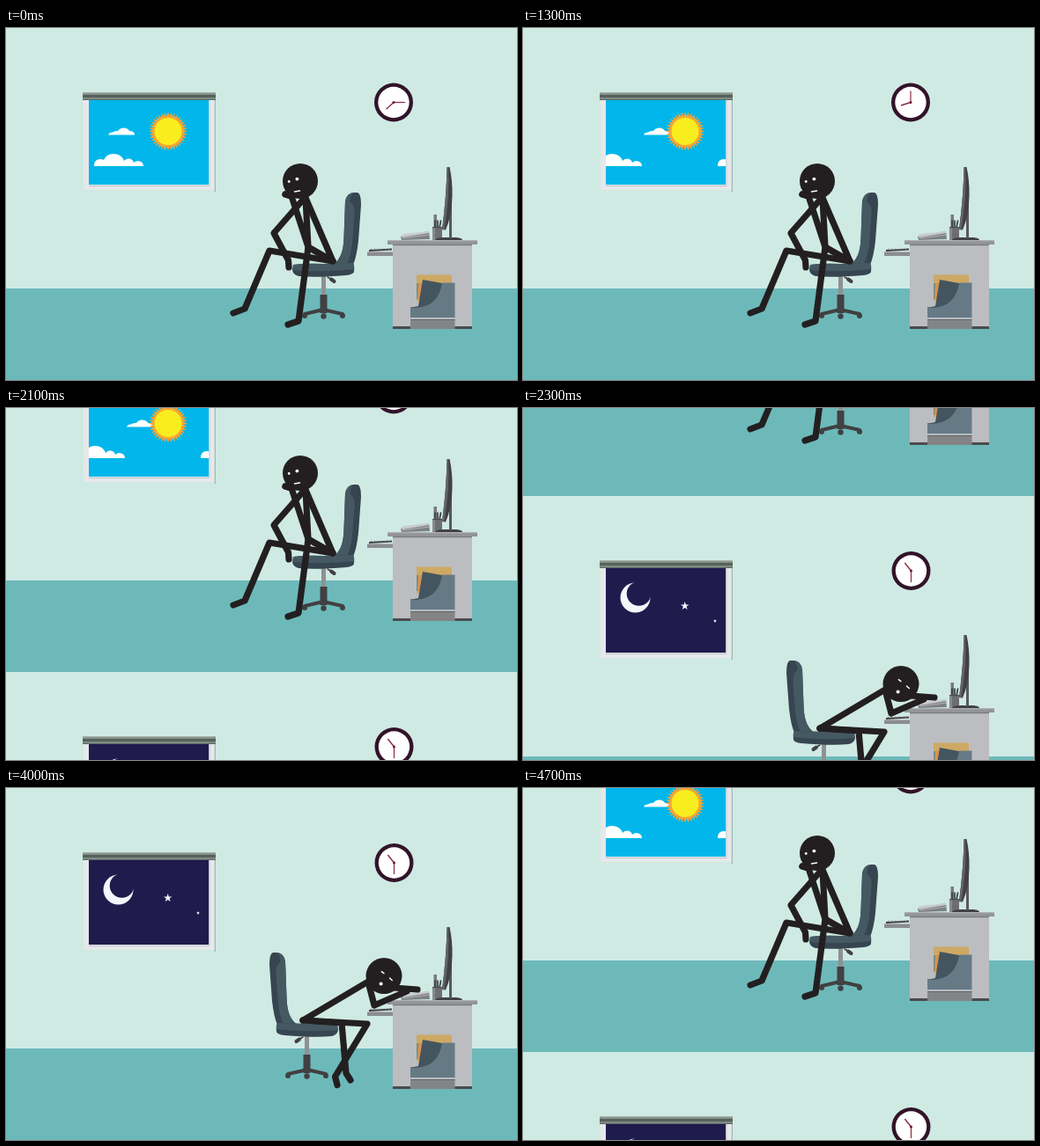
An HTML page with a canvas that plays this animation: 580x400 px, repeating every 4.8 s.

```html
<!DOCTYPE html>
<html lang="en">
<head>
<meta charset="utf-8">
<title>Office, day and night</title>
<style>
html, body { margin: 0; width: 580px; height: 400px; overflow: hidden; background: #cfeae3; }
canvas { display: block; }
</style>
</head>
<body>
<canvas id="stage" width="580" height="400"></canvas>
<script>
const ctx = document.getElementById('stage').getContext('2d');
const STEP = 100, STEPS = 48, CYCLE = 7;
const INK = '#231f20';

function rect(x, y, w, h, color) {
  ctx.fillStyle = color;
  ctx.fillRect(x, y, w, h);
}

function disc(x, y, r, color) {
  ctx.fillStyle = color;
  ctx.beginPath();
  ctx.arc(x, y, r, 0, Math.PI * 2);
  ctx.fill();
}

function shape(d, color) {
  ctx.fillStyle = color;
  ctx.fill(new Path2D(d));
}

function line(d, width, color, cap = 'round') {
  ctx.lineWidth = width;
  ctx.strokeStyle = color;
  ctx.lineCap = cap;
  ctx.lineJoin = 'round';
  ctx.stroke(new Path2D(d));
}

function limb(d) {
  line(d, 7.2, INK);
}

function star(x, y, outer, inner, points, color) {
  ctx.fillStyle = color;
  ctx.beginPath();
  for (let i = 0; i < points * 2; i++) {
    const r = i % 2 ? inner : outer;
    const a = Math.PI * i / points - Math.PI / 2;
    ctx.lineTo(x + r * Math.cos(a), y + r * Math.sin(a));
  }
  ctx.fill();
}

function room() {
  rect(0, 0, 580, 296, '#cfeae3');
  rect(0, 296, 580, 104, '#6db9ba');
}

function bigCloud(dx) {
  ctx.save();
  ctx.translate(dx, 0);
  shape('M100 157 Q100 149 107 149 Q110 149 111 150 Q114 143 122 143 Q131 143 134 151 ' +
        'Q136 148 140 148.5 Q144 149 145 153 Q147 151 150 151 Q156 152 156 157 Z', '#fff');
  ctx.restore();
}

function smallCloud(dx) {
  ctx.save();
  ctx.translate(dx, 0);
  shape('M116 121.5 Q117 118.5 121 118.5 Q123 116.5 127 117 Q129 113.5 134 113.5 ' +
        'Q139 114 140 117 Q146 117 146 121.5 Z', '#fff');
  ctx.restore();
}

function daySky(s) {
  const drift = s * 3.5;
  rect(94, 82, 136.5, 96, '#00b6ea');
  smallCloud(drift);
  bigCloud(-drift);
  bigCloud(142 - drift);
  star(184, 117.5, 22, 17.5, 36, '#f7a535');
  disc(184, 117.5, 17.5, '#f7a535');
  disc(184, 117.5, 15.5, '#f9ed20');
}

function nightSky() {
  rect(94, 82, 136.5, 96, '#1f1b4d');
  disc(127.5, 115.5, 17, '#f3f6fa');
  disc(131.5, 111, 13.8, '#1f1b4d');
  star(183.7, 125, 5, 2, 5, '#f3f6fa');
  star(218, 142, 2, 0.9, 5, '#f3f6fa');
}

function windowFrame(sky) {
  rect(236.5, 76, 1.5, 110, '#a4b8b4');
  rect(88, 80, 148.5, 104, '#e6e8ea');
  ctx.save();
  ctx.beginPath();
  ctx.rect(94, 82, 136.5, 96);
  ctx.clip();
  sky();
  ctx.restore();
  rect(94, 179, 137, 1, '#bfc4ca');
  rect(230.5, 82, 1, 98, '#cdd2d6');
  rect(87, 73, 151, 9, '#7d8b84');
  rect(87, 73, 151, 1.5, '#9dada6');
  rect(87, 76, 151, 3, '#56625b');
  rect(87, 81, 151, 1, '#5f6a63');
}

function hand(x, y, degrees, length, width) {
  const a = degrees * Math.PI / 180;
  line(`M${x} ${y} l${length * Math.sin(a)} ${-length * Math.cos(a)}`, width, '#8c2a44', 'butt');
}

function clock(x, y, hour, minute) {
  disc(x, y, 22, '#321329');
  disc(x, y, 17.7, '#fff');
  hand(x, y, hour, 11.5, 1.4);
  hand(x, y, minute, 13, 1.2);
  disc(x, y, 1.5, '#6b1b35');
}

function chair() {
  line('M365 283 L373 288', 1.5, '#414042');
  line('M369 285.5 L372.5 288', 4, '#414042');
  rect(358, 281, 5, 23, '#8f9194');
  rect(356.5, 303, 8, 21, '#414042');
  line('M360 320 L339 325 M360 320 L382 325', 4, '#414042');
  disc(339, 327, 3, '#414042');
  disc(360.5, 327.5, 3.2, '#414042');
  disc(382, 327, 3, '#414042');
  shape('M373 268 C381 260 383 252 383.5 238 L385 197 Q387 187 395 187 L399 187 ' +
        'Q403 188 403 201 L400 242 Q398 260 394 269 Z', '#36454f');
  shape('M373 268 C381 260 383 252 383.5 238 L385 197 Q387 187 395 187 ' +
        'Q390 190 390.5 198 Q396 200 395.5 212 L393 246 Q391 260 387 268 Z', '#455963');
  shape('M326 269 Q342 267 360 268 L394 267 Q396 272 395 277 Q394 280 386 281 ' +
        'Q352 284 332 282 Q325 280 325 274 Z', '#36454f');
  shape('M326 269 Q342 267 360 268 L394 267 Q396 270 395 274 Q360 278 326 275 Z', '#455963');
}

function bin() {
  rect(466, 280.5, 40, 30, '#cda964');
  rect(466, 290, 3, 18, '#639487');
  shape('M468 290 L474 289 L472 308 L467 308 Z', '#dd8e50');
  shape('M459 317 Q487 320 495 289.5 L509.5 289.5 V330 H459 Z', '#667a86');
  shape('M473 286 L495 290 C492 308 482 319 459 318 L468 316 Z', '#43555f');
  rect(459, 329, 50.5, 1.5, '#b3bdc3');
  rect(459, 331, 50.5, 11, '#828486');
  rect(459, 331, 50.5, 1, '#636568');
}

function desk() {
  // keyboard on its tray
  rect(410, 254, 30, 5, '#8b8d90');
  rect(410, 254, 30, 1, '#b0b2b4');
  line('M412 253 L438 251.5', 2, '#414042', 'butt');
  for (let x = 414; x < 438; x += 4) rect(x, 250.5, 1, 1.5, '#8b8d90');

  rect(439, 245, 90, 96, '#bcbdc0');
  rect(439, 246, 90, 1.2, '#77797c');
  rect(439, 339, 90, 3, '#4b4b4e');
  bin();

  // papers
  shape('M448 237 L480 231 L481 240 L449 241 Z', '#7f8184');
  shape('M448 236 L452 234 L480 231 L480 233 L450 238 Z', '#c9cbcd');
  line('M450 239 L480 235', 1, '#b2b4b6', 'butt');

  // pens and cup
  rect(485.5, 212, 3.5, 16, '#77797c');
  line('M487 219 V227 M490 219 V227 M493.5 219 L492 227', 1.7, '#3b4047');
  rect(484, 226, 11, 15, '#6d6e71');
  rect(484, 226, 3, 15, '#88898c');
  rect(484, 226, 11, 1.2, '#4d4d50');

  // screen
  shape('M487 241 Q488 238 497 238 H511 Q518 238.5 518 241 Z', '#414042');
  rect(503, 180, 3, 59, '#58595b');
  shape('M500.5 158 H503.5 Q507 174 506.5 191 Q506 214 499 229.5 L495 229 Q500 190 500.5 158 Z', '#414042');
  shape('M500.5 158 H502 Q504 190 497.5 229.3 L495 229 Q500 190 500.5 158 Z', '#626366');

  rect(433, 241, 102, 5, '#929497');
  rect(433, 241, 102, 1.3, '#aeb0b3');
}

function thinker(blink) {
  limb('M340 193 L371 265 L299 253 L271 319 L258 324');
  limb('M371 265 L343 249 L332 333 L320 337');
  limb('M339 193 L304 233 L320.5 264 L321 272');
  limb('M340 193 L343 249 L324 191 L317 189');
  disc(334, 174, 20, INK);
  limb('M324 191 L317 189');
  if (blink) {
    line('M319.8 174.5 H322.4 M328.8 171.5 H332.2', 0.8, '#fff');
  } else {
    disc(321.2, 174.5, 1.4, '#fff');
    disc(330.4, 171.6, 1.9, '#fff');
  }
  line('M327.5 186 L333.5 185', 1.4, '#fff');
}

function sleeper() {
  limb('M337 264 L381 267 L386 324 L391 332');
  limb('M337 264 L410 268 L373.5 328 L376 337.5');
  limb('M337 264 L411 220 L418 247 L455 231');
  limb('M440 227 L467 229');
  disc(429, 213.5, 20.5, INK);
  line('M426.3 208.6 L429 210.6 M435.5 216 L438.3 218.6', 1.4, '#fff');
  disc(425.6, 222.6, 2, '#fff');
}

function day(s, blink) {
  room();
  windowFrame(() => daySky(s));
  clock(440, 84.5, 227 + s * 4.2, 90 + s * 45);
  desk();
  chair();
  thinker(blink);
}

function night(s) {
  room();
  windowFrame(nightSky);
  clock(440.5, 85, 314 + s * 3.75, 90 + s * 45);
  desk();
  ctx.save();
  ctx.translate(702, 0);
  ctx.scale(-1, 1);
  chair();
  ctx.restore();
  sleeper();
}

function scroll(k) {
  if (k <= 20) return 0;
  if (k < 24) return (k - 20) * 100;
  if (k <= 44) return 400;
  return (48 - k) * 100;
}

function draw(now) {
  const k = Math.floor(now / STEP) % STEPS;
  const y = scroll(k);
  const dayState = k <= 20 ? k % CYCLE : 6;
  const nightState = k > 24 && k <= 44 ? (k - 24) % CYCLE : 2;

  ctx.save();
  ctx.translate(0, -y);
  if (y < 400) day(dayState, k === 10);
  ctx.translate(0, 400);
  if (y > 0) night(nightState);
  ctx.restore();
}

let start;
function tick(now) {
  if (start === undefined) start = now;
  draw(now - start);
  requestAnimationFrame(tick);
}
draw(0);
requestAnimationFrame(tick);
</script>
</body>
</html>
```
